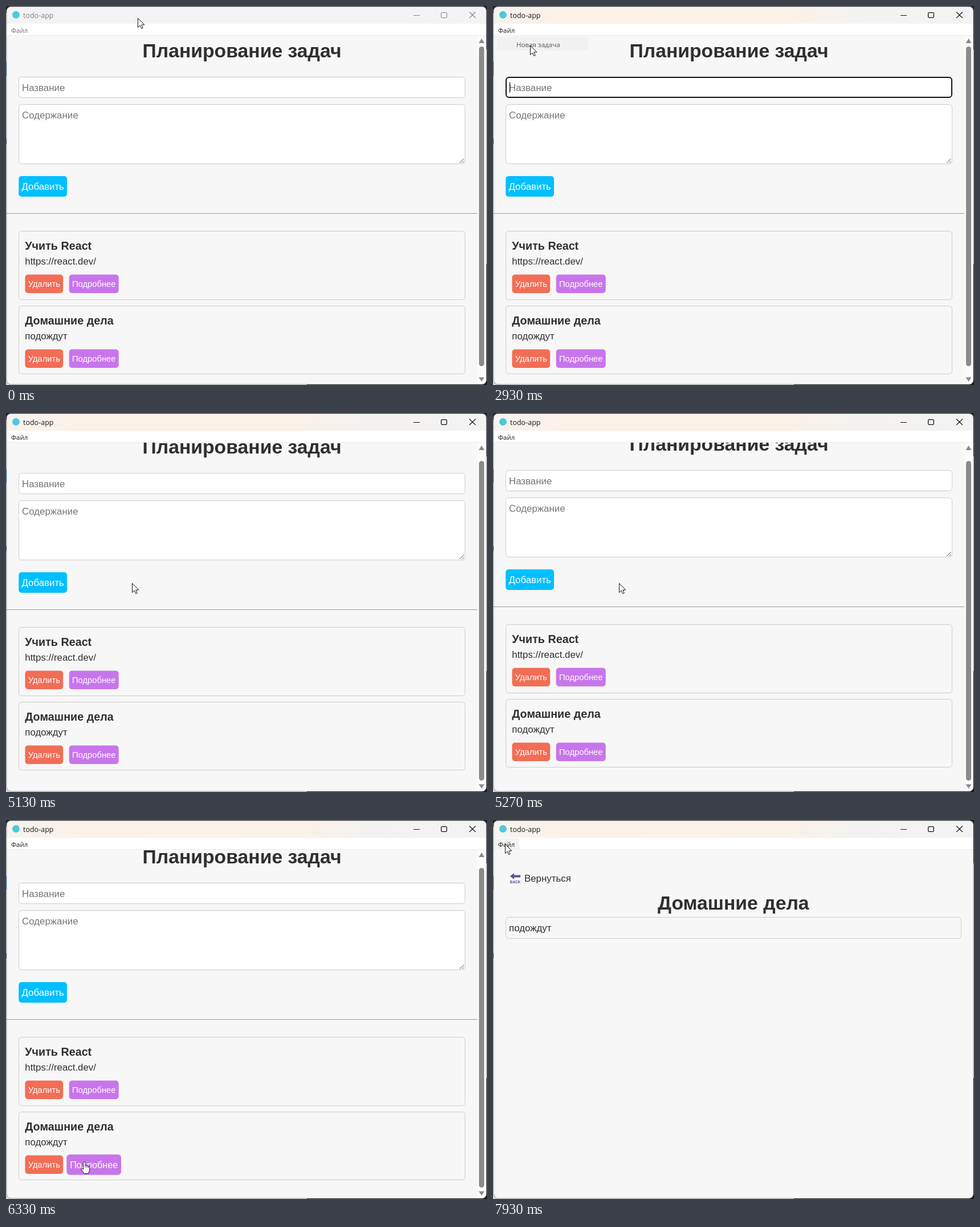
Recreate the animation shown at these times as an HTML page with a canvas. Size 844 by 664 pixels, loop 8 s.

```html
<!DOCTYPE html>
<html lang="ru">
<head>
<meta charset="utf-8">
<title>todo-app</title>
<style>
html, body { margin: 0; width: 844px; height: 664px; overflow: hidden; }
canvas { display: block; }
</style>
</head>
<body>
<canvas id="stage" width="844" height="664"></canvas>
<script>
const ctx = document.getElementById('stage').getContext('2d');
const LOOP = 8000, FPS = 15;
const BASE = 16.87;
const PAGE = '#f7f7f7', INK = '#2f2f2f', HINT = '#757575', LINE = '#cccccc';
const SANS = '"Liberation Sans", Arial, sans-serif';
const UI = '"Open Sans", "Noto Sans", sans-serif';

// Moments of the scene, in ms
const ACTIVE = 1000, MENU_OPEN = 1430, MENU_PICK = 2925, BLUR = 4520;
const HOVER = 6060, DETAIL = 6660;

// Rows of [time, values...]
const POINTER = [
  [0, 231, 21], [333, 181, 49], [467, 181, 49], [1000, 12, 36], [1867, 12, 36],
  [2333, 65, 69], [2933, 65, 69], [3600, 221, 298], [5533, 221, 298],
  [5733, 185, 510], [6133, 137, 598], [7000, 137, 598], [7733, 14, 30],
  [7867, 19, 38], [7933, 21, 42]
];
const SCROLL = [
  [4867, 0], [5067, 14], [5200, 24], [5267, 24], [5400, 20],
  [5533, 17], [5667, 15], [5733, 14]
];

const clamp = v => Math.max(0, Math.min(1, v));
const ramp = (t, from, to) => clamp((t - from) / (to - from));
const smooth = p => p * p * (3 - 2 * p);
const linear = p => p;

function track(rows, t, ease) {
  let i = 0;
  while (i < rows.length - 2 && t >= rows[i + 1][0]) i++;
  const a = rows[i], b = rows[i + 1], p = ease(ramp(t, a[0], b[0]));
  return a.slice(1).map((v, k) => v + (b[k + 1] - v) * p);
}

function fill(color, x, y, w, h) {
  ctx.fillStyle = color;
  ctx.fillRect(x, y, w, h);
}

function box(x, y, w, h, r, color, line, weight = 1) {
  ctx.beginPath();
  const in2 = line ? weight / 2 : 0;
  ctx.roundRect(x + in2, y + in2, w - 2 * in2, h - 2 * in2, r);
  if (color) { ctx.fillStyle = color; ctx.fill(); }
  if (line) { ctx.strokeStyle = line; ctx.lineWidth = weight; ctx.stroke(); }
}

function text(str, x, y, size, color = INK, weight = 400, family = SANS, align = 'left') {
  ctx.font = `${weight} ${size}px ${family}`;
  ctx.textAlign = align;
  ctx.fillStyle = color;
  ctx.fillText(str, x, y);
}

function lines(color, weight, ...segs) {
  ctx.beginPath();
  for (const [x1, y1, x2, y2] of segs) { ctx.moveTo(x1, y1); ctx.lineTo(x2, y2); }
  ctx.strokeStyle = color;
  ctx.lineWidth = weight;
  ctx.stroke();
}

function poly(color, pts) {
  ctx.beginPath();
  pts.forEach(([x, y]) => ctx.lineTo(x, y));
  ctx.closePath();
  ctx.fillStyle = color;
  ctx.fill();
}

function button(label, x, y, w, h, color, size, base, scale = 1) {
  ctx.save();
  ctx.translate(x + w / 2, y + h / 2);
  ctx.scale(scale, scale);
  box(-w / 2, -h / 2, w, h, 5, color);
  text(label, 0, base - h / 2, size, '#ffffff', 400, SANS, 'center');
  ctx.restore();
}

function desktop() {
  fill('#d6d6d6', 0, 0, 844, 664);
  fill('#20222b', 0, 0, 844, 1);
  fill('#20222b', 0, 0, 12, 12);
  fill('#20222b', 832, 0, 12, 76);
  fill('#1b1b1b', 832, 452, 12, 212);
  fill('#1b1b1b', 528, 655, 316, 9);
  fill('#2a72c8', 0, 98, 1, 24);
  fill('#44508c', 0, 233, 1, 9);
}

function titleBar(t, px, py) {
  const on = t >= ACTIVE;
  fill('#f3f3f3', 1, 1, 842, 31);
  const glow = ramp(t, ACTIVE - 67, ACTIVE + 200);
  if (glow) {
    const g = ctx.createLinearGradient(1, 0, 843, 0);
    [[0, '#f6f3f0'], [.14, '#fbf1e7'], [.62, '#faf1e7'], [.74, '#f4f2f0'], [1, '#f3f3f3']]
      .forEach(([p, c]) => g.addColorStop(p, c));
    ctx.globalAlpha = glow;
    fill(g, 1, 1, 842, 31);
    ctx.globalAlpha = 1;
  }
  ctx.beginPath();
  ctx.arc(17.5, 15.5, 6.5, 0, 7);
  ctx.fillStyle = '#4cc9dc';
  ctx.fill();
  text('todo-app', 30, 20.5, 12.5, on ? '#1a1a1a' : '#808080', 400, UI);

  const mark = on ? '#111111' : '#858585';
  lines(mark, 1, [715, 16.5, 726, 16.5]);
  box(763, 11, 11, 10, 1.5, null, mark, on ? 1.3 : 1);
  lines(mark, 1.1, [813, 10.5, 824, 21], [824, 10.5, 813, 21]);

  fill('#ffffff', 1, 31, 842, 20);
  const open = t >= MENU_OPEN && t < MENU_PICK;
  const over = px > 1 && px < 46 && py >= 31 && py < 51;
  if (open || (on && over)) fill('#f3f3f3', 1, 32, 45, 19);
  fill('#ededed', 1, 51, 842, 1);
  text('Файл', 9, 47, 11.4, on ? '#1a1a1a' : '#6d6d6d', 400, UI);
}

function field(y, h, hint, base, focus) {
  box(22, y, 784, h, 5, '#ffffff', focus ? '#101010' : LINE, focus ? 2 : 1);
  text(hint, 28, base, BASE, HINT);
}

function card(y, h, title, body, scale) {
  box(22, y, 784, h, 5, null, LINE);
  text(title, 33.3, y + 32.5, 19.74, INK, 700);
  text(body, 33.3, y + 59, BASE);
  button('Удалить', 33.5, y + 76.5, 66.7, 32.5, '#f26d55', 14.76, 21.7);
  button('Подробнее', 110.7, y + 76.5, 87, 32.5, '#c875ec', 14.76, 21.7, scale);
}

function listPage(t) {
  const offset = track(SCROLL, t, linear)[0];
  const focus = t >= MENU_PICK && t < BLUR;
  ctx.save();
  ctx.beginPath();
  ctx.rect(1, 52, 826, 611);
  ctx.clip();
  ctx.translate(0, -Math.round(offset));
  text('Планирование задач', 414, 89.5, 2 * BASE, INK, 700, SANS, 'center');
  field(124, 37, 'Название', 149, focus);
  if (focus && Math.floor((t - MENU_PICK) / 533) % 2 === 0) fill('#000000', 29, 133, 1, 19);
  field(172, 105, 'Содержание', 196.5);
  lines('#555555', 1, [796, 275, 803.5, 267.5], [800.5, 275, 803.5, 272]);
  button('Добавить', 22.3, 298, 84.7, 36, '#00bfff', BASE, 24);
  fill('#9a9a9a', 1, 363, 826, 1);
  card(394, 121, 'Учить React', 'https://react.dev/', 1);
  card(525, 120, 'Домашние дела', 'подождут', 1 + .1 * smooth(ramp(t, HOVER, HOVER + 270)));
  ctx.restore();

  fill('#fbfbfb', 827, 52, 16, 611);
  const grey = '#8b8b8b';
  poly(grey, [[829.5, 65], [834.5, 57], [839.5, 65]]);
  poly(grey, [[829.5, 650.5], [834.5, 658], [839.5, 650.5]]);
  box(830, 71 + 13 * Math.min(1, offset / 14), 9, 560, 4.5, grey);
}

function detailPage() {
  const violet = '#5d4f97';
  poly(violet, [[30, 98.5], [37, 93], [37, 96.5], [48, 96.5], [48, 100.5], [37, 100.5], [37, 104]]);
  text('BACK', 39, 110.5, 6.4, violet, 700, SANS, 'center');
  text('Вернуться', 55, 108, BASE);
  text('Домашние дела', 421.8, 156.5, 2 * BASE, INK, 700, SANS, 'center');
  box(22, 170, 800, 38, 5, null, LINE);
  text('подождут', 28, 195, BASE);
}

function menu(t, px, py) {
  const show = ramp(t, MENU_OPEN, 1600);
  const gone = ramp(t, 2870, 3130);
  const open = t < MENU_PICK;
  if (!show || gone === 1) return;
  ctx.save();
  ctx.globalAlpha = open ? show : 1 - gone;
  if (open) {
    ctx.shadowColor = 'rgba(0,0,0,.16)';
    ctx.shadowBlur = 12;
    ctx.shadowOffsetY = 4;
    box(2.5, 50.5, 169, 31, 6, '#f9f9f9');
    ctx.shadowColor = 'transparent';
    box(2.5, 50.5, 169, 31, 6, null, '#e0e0e0');
  }
  if (!open || (px > 7 && py >= 54)) box(7, 54, 160, 24, 3, '#f0f0f0');
  text('Новая задача', 41, 71.5, 11.6, '#262626', 400, UI);
  ctx.restore();
}

function arrow(x, y) {
  ctx.save();
  ctx.translate(x + .5, y + .5);
  ctx.lineJoin = 'round';
  poly('#ffffff', [[0, 0], [0, 16], [3.8, 12.6], [6.2, 18], [8.7, 17], [6.3, 11.6], [11.4, 11.4]]);
  ctx.strokeStyle = '#111111';
  ctx.lineWidth = 1;
  ctx.stroke();
  ctx.restore();
}

function hand(x, y) {
  ctx.save();
  ctx.translate(x - 6, y);
  ctx.beginPath();
  ctx.moveTo(4.5, 14);
  ctx.lineTo(4.5, 2.5);
  ctx.quadraticCurveTo(6.3, -1, 8, 2.5);
  ctx.lineTo(8, 7.5);
  ctx.quadraticCurveTo(10, 6, 11, 8);
  ctx.quadraticCurveTo(13, 7, 13.7, 9);
  ctx.quadraticCurveTo(16, 8.5, 16, 11);
  ctx.lineTo(15.6, 16);
  ctx.lineTo(13.6, 21.5);
  ctx.lineTo(6.5, 21.5);
  ctx.lineTo(1, 14.5);
  ctx.quadraticCurveTo(1, 11, 4.5, 14);
  ctx.fillStyle = '#ffffff';
  ctx.fill();
  ctx.strokeStyle = '#111111';
  ctx.lineWidth = 1;
  ctx.stroke();
  lines('#111111', .8, [8, 7, 8, 11], [11, 8, 11, 11.5], [13.7, 9, 13.7, 12]);
  ctx.restore();
}

function draw(t) {
  const [px, py] = track(POINTER, t, smooth).map(Math.round);
  desktop();
  ctx.save();
  ctx.beginPath();
  ctx.roundRect(1, 1, 842, 662, 8);
  ctx.clip();
  fill(PAGE, 1, 1, 842, 662);
  titleBar(t, px, py);
  if (t < DETAIL) listPage(t); else detailPage();
  ctx.restore();
  box(.5, .5, 843, 663, 8, null, 'rgba(90,90,90,.55)');
  menu(t, px, py);
  if (t >= HOVER && t < DETAIL) hand(px, py); else arrow(px, py);
}

function tick() {
  const now = performance.now() % LOOP;
  draw(Math.floor((now + 4) * FPS / 1000) % (LOOP * FPS / 1000) * 1000 / FPS);
  requestAnimationFrame(tick);
}
tick();
</script>
</body>
</html>
```
